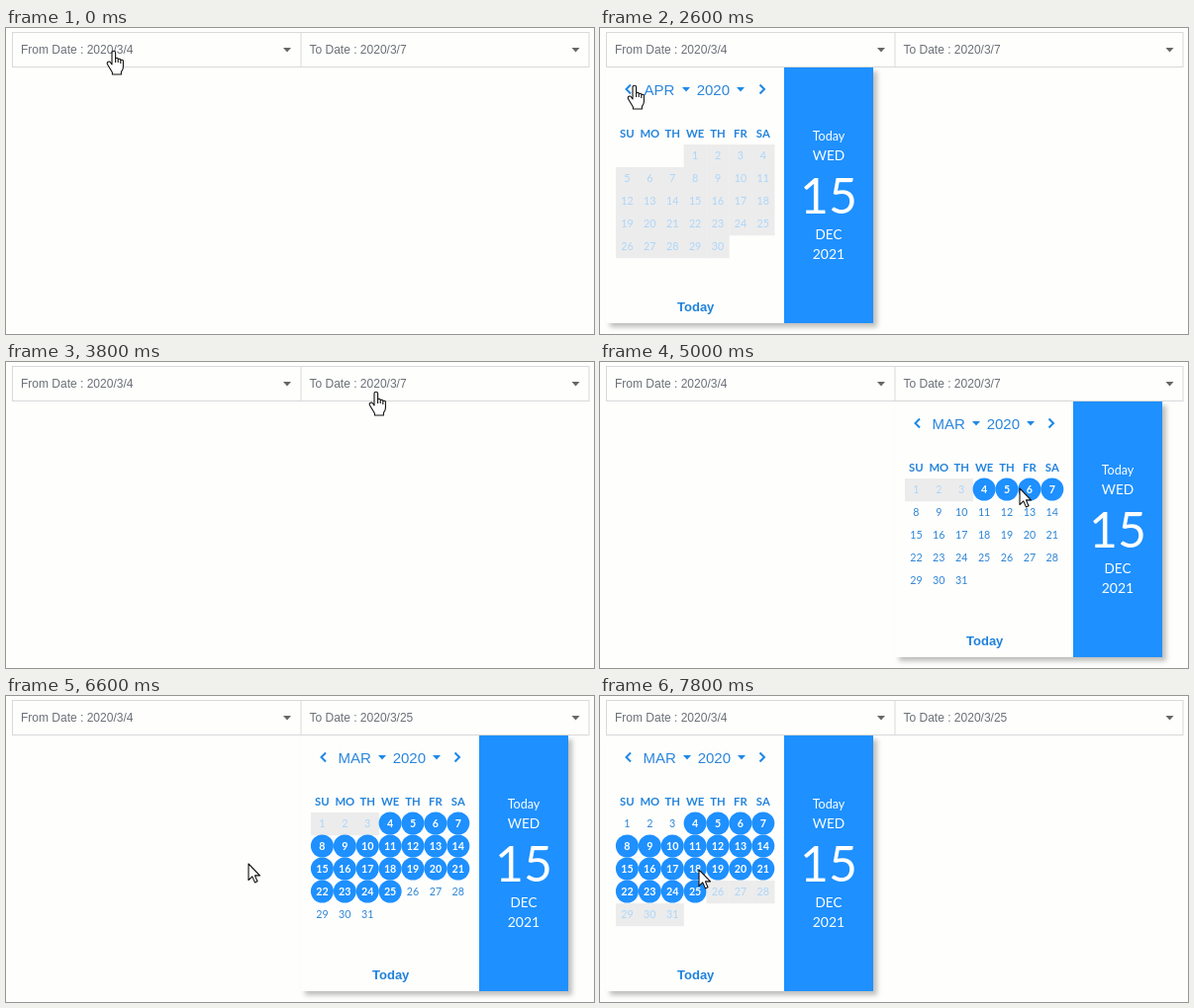
These frames come from a looping animation (594x310 px, 8 s). An HTML page:

```html
<!DOCTYPE html>
<html lang="en">
<head>
<meta charset="utf-8">
<title>Date range picker</title>
<style>
  html, body { margin: 0; width: 100%; height: 100%; overflow: hidden; background: #fefefd; }
  svg { display: block; width: 594px; height: 310px; }
  .ui { font-family: "Liberation Sans", Arial, sans-serif; }
  .round { font-family: Lato, Carlito, sans-serif; }
  .mid { text-anchor: middle; }
  .field { fill: #6b7076; font-size: 12px; }
  .box { fill: #fefefd; stroke: #d9d9d9; }
  .popup { filter: drop-shadow(4px 4px 2.5px rgba(0, 0, 0, .25)); }
  .title { fill: #2b86dc; font-size: 15px; }
  .chevron { fill: none; stroke: #1e88e5; stroke-width: 2; }
  .weekday { fill: #2484dc; font-size: 11.3px; font-weight: 700; }
  .day { fill: #2f86d6; font-size: 10.7px; }
  .disabled { fill: #acd6fa; }
  .selected { fill: #fff; font-weight: 700; }
  .today { fill: #1f82dc; font-size: 13px; font-weight: 700; }
  .panel { fill: #fff; }
  .cursor { fill: #fff; stroke: #111; stroke-width: 1.1; stroke-linejoin: round; }
</style>
</head>
<body>
<svg id="stage" viewBox="0 0 594 310"></svg>
<script>
const LOOP = 8000, STEP = 200, BLUE = "#1e90ff";
const COLUMN = 22.9, ROW = 23;
const MONTHS = {
  MAR: { first: 0, days: 31, number: 3, inset: 0 },
  APR: { first: 3, days: 30, number: 4, inset: 1 },
};
const FROM = 304; // dates are compared as month * 100 + day

// Pointer stops: time, x, y
const PATH = [
  [0, 109, 23], [200, 109, 23], [600, 122, 56], [1200, 178, 92],
  [1600, 164, 58], [1800, 164, 58], [2400, 35, 58], [2800, 35, 58],
  [3200, 220, 130], [3400, 312, 104], [3600, 356, 40], [3800, 374, 30],
  [4200, 374, 30], [5000, 424, 128], [5600, 389, 193], [5800, 389, 193],
  [6600, 245, 170], [6800, 245, 170], [7200, 112, 28], [7400, 112, 28],
  [7800, 100, 176],
];

const text = (x, y, cls, content, extra = "") =>
  `<text x="${x}" y="${y}" class="${cls}" ${extra}>${content}</text>`;
const rect = (x, y, w, h, attrs) =>
  `<rect x="${x}" y="${y}" width="${w}" height="${h}" ${attrs}/>`;
const triangle = (x, y, color) =>
  `<path d="M${x - 4} ${y}h8l-4 4.6z" fill="${color}"/>`;

function field(x, width, label) {
  return rect(x + .5, 4.5, width, 35, 'class="box"')
    + text(x + 9, 26, "ui field", label)
    + triangle(x + 278, 20, "#666");
}

function dayCell(day, month, disabled, selected) {
  const slot = month.first + day - 1;
  const column = slot % 7, row = Math.floor(slot / 7);
  const x = 27.4 + column * COLUMN, y = 129 + row * ROW;
  let back = "", cls = "round mid day";
  if (disabled) {
    back = rect(x - COLUMN / 2, y - 11, COLUMN + .2, ROW + .2, 'fill="#ececec"');
    cls += " disabled";
  } else if (selected) {
    back = `<circle cx="${x}" cy="${y}" r="11.5" fill="${BLUE}"/>`;
    cls += " selected";
  }
  return back + text(x, y + 3.8, cls, day);
}

function calendar(side, name, to) {
  const month = MONTHS[name], inset = month.inset;
  let out = rect(6, 40, 270, 259, 'class="popup" fill="#fefefd"')
    + rect(186, 40, 90, 259, `fill="${BLUE}"`)
    + '<path class="chevron" d="M31 57.5l-4.5 4.5 4.5 4.5M161.500 57.5l4.500 4.500-4.500 4.500"/>'
    + text(43.5 + inset, 68, "ui title", name) + triangle(88 - inset, 60, "#1e88e5")
    + text(98.7 - inset, 68, "ui title", 2020) + triangle(143 - inset, 60, "#1e88e5");
  "SU MO TH WE TH FR SA".split(" ").forEach((label, i) => {
    out += text(27.4 + i * COLUMN, 111, "round mid weekday", label);
  });
  for (let day = 1; day <= month.days; day++) {
    const date = month.number * 100 + day;
    const disabled = side === "from" ? date > to : date < FROM;
    out += dayCell(day, month, disabled, date >= FROM && date <= to);
  }
  out += text(96.7, 287, "ui mid today", "Today");
  [["Today", 114, 12.6], ["WED", 134, 13.7], [15, 188, 50], ["DEC", 214, 13.5], [2021, 234, 14]]
    .forEach(([label, y, size]) => {
      out += text(231, y, "round mid panel", label, `font-size="${size}"`);
    });
  return `<g transform="translate(${side === "from" ? 0 : 292})">${out}</g>`;
}

function pointerAt(t) {
  const next = PATH.findIndex(stop => stop[0] > t);
  if (next < 0) return PATH[PATH.length - 1].slice(1);
  const [t0, x0, y0] = PATH[next - 1], [t1, x1, y1] = PATH[next];
  const k = (t - t0) / (t1 - t0);
  return [x0 + (x1 - x0) * k, y0 + (y1 - y0) * k];
}

function cursor(x, y, hand) {
  const shape = hand
    ? "M-2 14V2a1.8 1.8 0 0 1 3.600 0v6a1.5 1.5 0 0 1 2.600 0v1a1.5 1.5 0 0 1 2.600 0v1a1.5 1.5 0 0 1 2.600 0v6.500q0 3-2 5v2.500H-1.600v-2L-6.400 14q-1-2 .6-2.800t2.400.8zM1.600 8v4M4.200 9v3M6.800 10v3"
    : "M0 0V16.500l3.800-3.600 2.600 6 2.600-1.100-2.600-5.900H11.500z";
  return `<path class="cursor" transform="translate(${x} ${y})" d="${shape}"/>`;
}

function scene(t) {
  const between = (a, b) => t >= a && t < b;
  const to = t < 5800 ? 307 : 325;
  const fromOpen = between(200, 3400) || t >= 7400;
  const toOpen = between(4200, 6800);
  const month = between(1800, 2800) ? "APR" : "MAR";
  const [x, y] = pointerAt(t);
  const overNav = fromOpen && y > 54 && y < 68
    && (Math.abs(x - 29) < 8 || Math.abs(x - 164) < 8);
  return field(6, 292, "From Date : 2020/3/4")
    + field(297.5, 291, "To Date : 2020/3/" + to % 100)
    + (fromOpen ? calendar("from", month, to) : "")
    + (toOpen ? calendar("to", "MAR", to) : "")
    + cursor(x, y, y < 40 || overNav);
}

const stage = document.getElementById("stage");
const start = performance.now();
let shown = -1;

function tick() {
  const elapsed = (performance.now() - start) % LOOP;
  const t = Math.floor(elapsed / STEP) * STEP;
  if (t !== shown) stage.innerHTML = scene(shown = t);
  requestAnimationFrame(tick);
}
tick();
</script>
</body>
</html>
```
